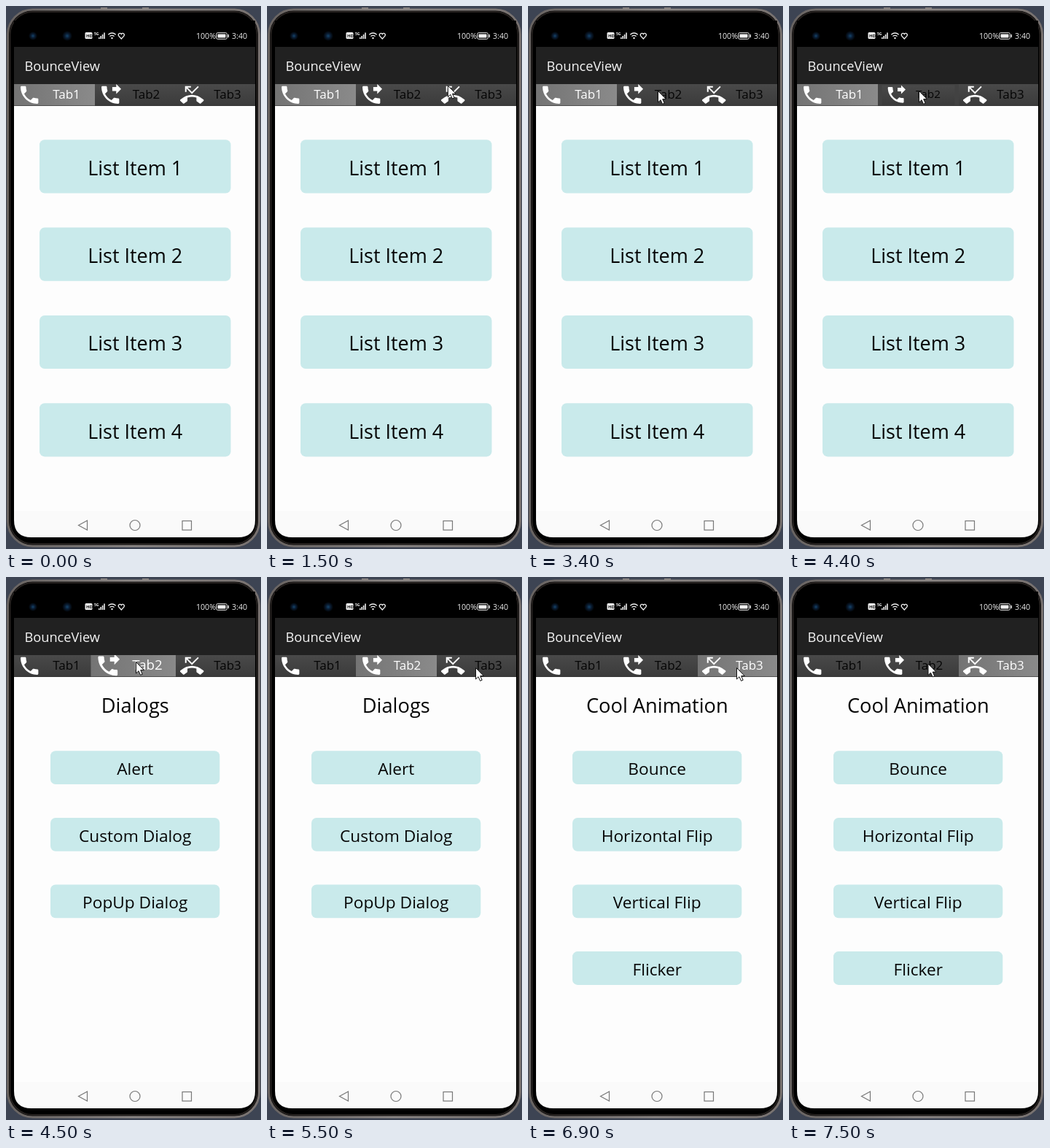
Write an HTML page that moves like this. It is 350 by 744 pixels and loops after 8000 ms.

```html
<!DOCTYPE html>
<html lang="en">
<head>
<meta charset="utf-8">
<title>BounceView</title>
<style>
  html, body { margin: 0; width: 100%; height: 100%; overflow: hidden; background: #3d4453; }
  svg { display: block; width: 350px; height: 744px; font-family: "Open Sans", "Noto Sans", sans-serif; }
  .pages text { text-anchor: middle; fill: #050505; }
  .tab text { text-anchor: middle; font-size: 17px; }
</style>
</head>
<body>
<svg viewBox="0 0 350 744">
  <defs>
    <linearGradient id="rim" x1="0" y1="0" x2="1" y2="0">
      <stop offset="0" stop-color="#686361"/>
      <stop offset=".5" stop-color="#8c8785"/>
      <stop offset="1" stop-color="#77716f"/>
    </linearGradient>
    <linearGradient id="off" x1="0" y1="0" x2="0" y2="1">
      <stop offset="0" stop-color="#494949"/>
      <stop offset="1" stop-color="#3b3b3b"/>
    </linearGradient>
    <linearGradient id="on" x1="0" y1="0" x2="1" y2="0">
      <stop offset="0" stop-color="#747474"/>
      <stop offset="1" stop-color="#8a8a8a"/>
    </linearGradient>
    <radialGradient id="lens">
      <stop offset="0" stop-color="#16456b"/>
      <stop offset=".45" stop-color="#0a1d33"/>
      <stop offset="1" stop-color="#000"/>
    </radialGradient>
    <clipPath id="screen"><path d="M11 20H342V704Q342 728 318 728H35Q11 728 11 704Z"/></clipPath>
    <clipPath id="bar"><rect x="11" y="107" width="331" height="30"/></clipPath>
  </defs>

  <!-- phone body -->
  <rect width="350" height="744" fill="#3d4453"/>
  <path d="M130 3H139M187 3H196" stroke="#8c8785" stroke-width="2"/>
  <rect x="2.5" y="5" width="345" height="735" rx="34" fill="#000" stroke="url(#rim)" stroke-width="3"/>
  <rect x="5.5" y="8" width="339" height="729" rx="31" fill="none" stroke="#25211f" stroke-width="2"/>

  <g clip-path="url(#screen)">
    <rect y="20" width="350" height="36" fill="#000"/>
    <rect y="56" width="350" height="51" fill="#212121"/>
    <rect y="137" width="350" height="555" fill="#fdfdfd"/>
    <rect y="692" width="350" height="36" fill="#fafafa"/>
    <text x="25.5" y="89" font-size="18.2" font-weight="500" fill="#f4f4f4">BounceView</text>
    <g fill="none" stroke="#777" stroke-width="1.2">
      <path d="M111.5 705V718L99.5 711.5Z"/>
      <circle cx="177" cy="711.5" r="7"/>
      <rect x="242" y="705.5" width="12.5" height="12.5"/>
    </g>
  </g>

  <!-- status bar -->
  <circle cx="37" cy="41" r="6" fill="url(#lens)"/>
  <circle cx="84" cy="41" r="7" fill="url(#lens)"/>
  <g fill="#eee">
    <rect x="108.5" y="36" width="10" height="9" rx="1.5"/>
    <text x="110" y="43" font-size="6" font-weight="700" fill="#111">HD</text>
    <text x="121" y="40" font-size="5" font-weight="700">5G</text>
    <path d="M127 43h1.6v2h-1.6zM129.4 41h1.6v4h-1.6zM131.8 39h1.6v6h-1.6zM134.2 36.5h1.6v8.5h-1.6z"/>
    <text x="261" y="44.5" font-size="10.6">100%</text>
    <text x="310" y="44.5" font-size="10.6">3:40</text>
    <rect x="290.5" y="38.5" width="11" height="5" rx=".8"/>
    <rect x="304.6" y="39" width="1.4" height="4"/>
    <circle cx="145.5" cy="44" r="1.2"/>
  </g>
  <g fill="none" stroke="#eee" stroke-width="1.3">
    <path d="M140.3 39.3Q145.5 34.8 150.7 39.3M142.4 41.6Q145.5 39 148.6 41.6"/>
    <path d="M158.3 45L154.8 41.2C153 38.5 156.5 35.8 158.3 38.6C160.1 35.8 163.6 38.5 161.8 41.2Z"/>
    <rect x="288.7" y="36.7" width="14.6" height="8.6" rx="1.8" stroke-width="1"/>
  </g>

  <g clip-path="url(#bar)">
    <rect x="11" y="107" width="331" height="30" fill="#424242"/>
    <g id="tabs"></g>
    <path d="M11 136.5H342" stroke="#2d2d2d" stroke-opacity=".6"/>
  </g>
  <g class="pages" id="pages"></g>
  <path id="cursor" d="M.5 .5V16L4 12.7L6.6 18.4L9.2 17.2L6.7 11.6H11.3Z" fill="#fff" stroke="#111" stroke-width="1" stroke-linejoin="round"/>
</svg>
<script>
const $ = id => document.getElementById(id);

const handset = "M6.62 10.79c1.44 2.83 3.76 5.14 6.59 6.59l2.2-2.2c.27-.27.67-.36 1.02-.24 1.12.37 2.33.57 3.57.57.55 0 1 .45 1 1V20c0 .55-.45 1-1 1-9.39 0-17-7.61-17-17 0-.55.45-1 1-1h3.5c.55 0 1 .45 1 1 0 1.25.2 2.45.57 3.57.11.35.03.74-.25 1.02z";
const forward = "M18 11l5-5-5-5v3h-4v4h4v3z";
const missed = "M6.5 5.5L12 11l7-7-1-1-6 6-4.5-4.5H11V3H5v6h1.5zM.2 16.8Q12 7.2 23.8 16.8Q24.3 17.4 23.8 18L21 20.7Q20.5 21 19.9 20.6L17 18.6Q16.6 18.3 16.6 17.8V14.7Q12 13.3 7.4 14.7V17.8Q7.4 18.3 7 18.6L4.1 20.6Q3.5 21 3 20.7L.2 18Q-.3 17.4 .2 16.8Z";

const tabs = [
  { x: 11, w: 111, iconX: 16, textX: 83, icon: handset },
  { x: 122, w: 111, iconX: 127, textX: 192.5, icon: handset + forward },
  { x: 233, w: 110, iconX: 239, textX: 304, icon: missed }
];
const pages = [
  { items: ["List Item 1", "List Item 2", "List Item 3", "List Item 4"],
    x: 46, y: 183.3, w: 262.5, h: 73.2, step: 120.3, size: 27, base: 48.4 },
  { title: "Dialogs", items: ["Alert", "Custom Dialog", "PopUp Dialog"] },
  { title: "Cool Animation", items: ["Bounce", "Horizontal Flip", "Vertical Flip", "Flicker"] }
];
const small = { x: 61, y: 238.3, w: 232.3, h: 45.8, step: 91.6, size: 22.7, base: 32.7 };

$("tabs").innerHTML = tabs.map(t => `<g class="tab">
  <rect x="${t.x}" y="107" width="${t.w}" height="30"/>
  <path d="${t.icon}" fill="#fff" transform="translate(${t.iconX} 105.6) scale(1.35)"/>
  <text x="${t.textX}" y="126.7">Tab${tabs.indexOf(t) + 1}</text></g>`).join("");

$("pages").innerHTML = pages.map(p => {
  const o = { ...small, ...p };
  const head = o.title ? `<text x="177.3" y="186" font-size="27.2">${o.title}</text>` : "";
  return `<g>${head}${o.items.map((s, i) => {
    const y = o.y + i * o.step;
    return `<rect x="${o.x}" y="${y}" width="${o.w}" height="${o.h}" rx="7" fill="#c9eaeb"/>
      <text x="177.2" y="${y + o.base}" font-size="${o.size}">${s}</text>`;
  }).join("")}</g>`;
}).join("");

// [time, x, y] of the pointer tip
const path = [
  [1300, 268, 109], [2200, 108, 106], [2300, 108, 106], [2700, 178, 116],
  [4900, 178, 116], [5500, 286, 124], [6900, 286, 124], [7500, 190.5, 118.5]
];
// [time, scale] held until the next entry
const bounces = [
  [],
  [[4200, .96], [4300, .9], [4500, 1.1], [4600, 1.05], [4700, .98], [4800, 1]],
  [[6500, .9], [6700, 1.1], [6800, 1.04], [6900, 1]]
];

const ease = u => u * u * (3 - 2 * u);
function pointer(t) {
  const i = path.findIndex(p => p[0] > t);
  if (i < 0) return path[path.length - 1].slice(1);
  const a = path[i - 1], b = path[i], u = ease((t - a[0]) / (b[0] - a[0]));
  return [a[1] + (b[1] - a[1]) * u, a[2] + (b[2] - a[2]) * u];
}
const held = (steps, t) => steps.reduce((v, s) => t >= s[0] ? s[1] : v, 1);

const tabEls = [...$("tabs").children];
const pageEls = [...$("pages").children];

function draw(t) {
  const active = t < 4500 ? 0 : t < 6700 ? 1 : 2;
  tabEls.forEach((g, i) => {
    const { x, w } = tabs[i], cx = x + w / 2, s = held(bounces[i], t);
    g.setAttribute("transform", `translate(${cx} 122) scale(${s}) translate(${-cx} -122)`);
    g.children[0].setAttribute("fill", i === active ? "url(#on)" : "url(#off)");
    g.children[2].setAttribute("fill", i === active ? "#fff" : "#050505");
  });
  pageEls.forEach((g, i) => g.style.display = i === active ? "" : "none");
  const shown = t >= 1400;
  $("cursor").style.display = shown ? "" : "none";
  if (shown) $("cursor").setAttribute("transform", `translate(${pointer(t)})`);
}

const start = performance.now();
function tick() {
  const t = (performance.now() - start) % 8000;
  draw(Math.floor(t / 100) * 100);
  requestAnimationFrame(tick);
}
tick();
</script>
</body>
</html>
```
